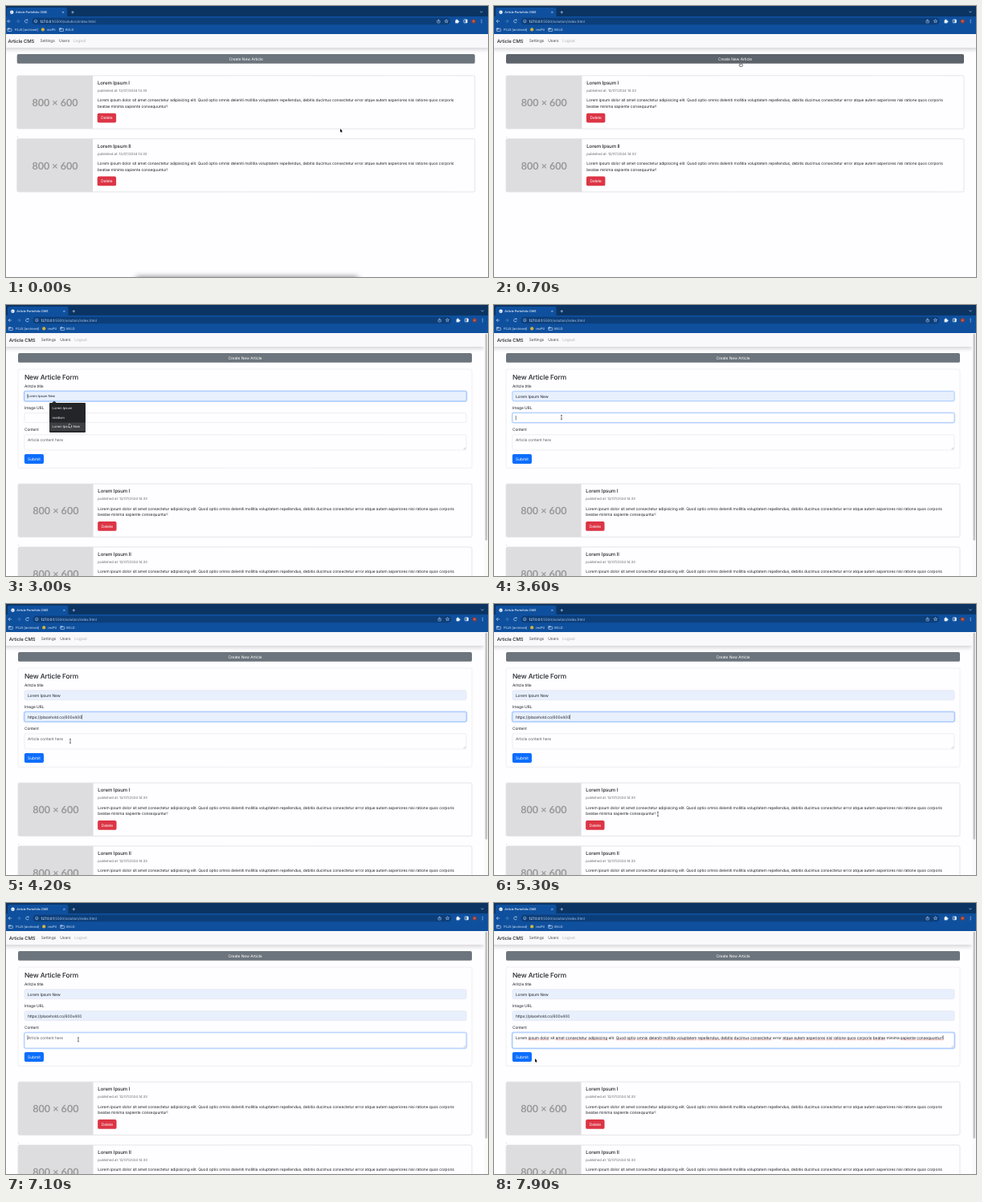
Write an HTML page with a canvas that moves like this. It is 600x338 px and loops after 8000 ms.

```html
<!DOCTYPE html>
<html lang="en">
<head>
<meta charset="utf-8">
<title>Article CMS</title>
<style>
  html, body { margin: 0; width: 100%; height: 100%; overflow: hidden; background: #fefdff; }
  canvas { display: block; width: 600px; height: 338px; }
</style>
</head>
<body>
<canvas id="stage"></canvas>
<script>
const canvas = document.getElementById('stage');
const ctx = canvas.getContext('2d');
const dpr = window.devicePixelRatio || 1;
canvas.width = 600 * dpr;
canvas.height = 338 * dpr;

const LOOP = 8000;
const INK = '#212529';
const BODY = 4.9;
const LINES = [
  'Lorem ipsum dolor sit amet consectetur adipisicing elit. Quod optio omnis deleniti mollitia voluptatem repellendus, debitis ducimus consectetur error atque autem asperiores nisi ratione quos corporis',
  'beatae minima sapiente consequuntur!'
];
const KNOWN_WORDS = ['Lorem', 'sit', 'elit.', 'error', 'minima'];
const IMAGE_URL = 'https://placehold.co/600x400';

// Moments of the story, in ms
const AT = {
  form: 1200, titleFocus: 2100, titleList: 2300, titlePick: 3200,
  urlFocus: 3500, urlList: 3700, urlPick: 4050,
  drag: 5500, dragEnd: 5900, contentFocus: 7000, paste: 7300
};

// Pointer stops: time, x, y
const PATH = [
  [0, 416, 153], [150, 416, 153], [650, 307, 70], [900, 306, 69.5], [1300, 306, 69.5],
  [1800, 227, 119], [2000, 227, 117], [2300, 227, 117], [2900, 79, 148], [3200, 77.5, 148],
  [3500, 84, 140], [3800, 84, 140], [4000, 80, 157], [4200, 80, 171], [4700, 81, 172],
  [5000, 126, 273], [5300, 204, 262], [5500, 204, 262], [5900, 115, 257], [6300, 115, 257],
  [6900, 90, 170], [7400, 90, 171], [7900, 51, 194], [8000, 51, 194]
];

let t = 0;
let mouse = { x: 0, y: 0 };

const clamp = v => Math.max(0, Math.min(1, v));
const ramp = (start, length = 150) => clamp((t - start) / length);
const within = (start, end) => t >= start && t < end;
const focusAmount = (start, end) => Math.min(ramp(start), 1 - ramp(end));
const over = (x, y, w, h) => mouse.x >= x && mouse.x <= x + w && mouse.y >= y && mouse.y <= y + h;

function pointer() {
  const i = PATH.findIndex((stop, k) => k > 0 && t <= stop[0]);
  const [t0, x0, y0] = PATH[i - 1];
  const [t1, x1, y1] = PATH[i];
  const p = (t - t0) / (t1 - t0);
  const e = p * p * (3 - 2 * p);
  return { x: x0 + (x1 - x0) * e, y: y0 + (y1 - y0) * e };
}

function setFont(size, weight = 400, family = 'Inter') {
  ctx.font = `${weight} ${size}px ${family}, sans-serif`;
  ctx.letterSpacing = family === 'Inter' ? `${-0.0145 * size}px` : '0px';
  ctx.textRendering = 'geometricPrecision';
}

// y is the middle of the capitals
function text(str, x, y, { size = BODY, color = INK, weight = 400, align = 'left', family } = {}) {
  setFont(size, weight, family);
  ctx.textAlign = align;
  ctx.fillStyle = color;
  ctx.fillText(str, x, y + size * 0.36);
  return ctx.measureText(str).width;
}

function rect(x, y, w, h, color) {
  ctx.fillStyle = color;
  ctx.fillRect(x, y, w, h);
}

function box(x, y, w, h, r, fill, stroke, line = 0.5) {
  ctx.beginPath();
  ctx.roundRect(x, y, w, h, r);
  if (fill) { ctx.fillStyle = fill; ctx.fill(); }
  if (stroke) { ctx.strokeStyle = stroke; ctx.lineWidth = line; ctx.stroke(); }
}

function dot(x, y, r, color) {
  ctx.beginPath();
  ctx.arc(x, y, r, 0, 7);
  ctx.fillStyle = color;
  ctx.fill();
}

function stroke(points, color, width = 0.6) {
  ctx.beginPath();
  points.forEach(([x, y]) => ctx.lineTo(x, y));
  ctx.strokeStyle = color;
  ctx.lineWidth = width;
  ctx.stroke();
}

function folder(x, y) {
  box(x, y - 1.7, 2.4, 1.5, 0.4, null, '#d5e4f8', 0.6);
  box(x, y - 1.1, 5, 3.2, 0.5, null, '#d5e4f8', 0.6);
}

function browser() {
  const pale = '#d5e4f8', dim = '#5d8fcb';
  rect(-3, 0, 606, 14, '#0b3463');
  box(2, 2, 75.5, 14, 2, '#0f509e');
  rect(-3, 13, 606, 22, '#0f509e');
  dot(8.5, 7.8, 2.2, '#f2f6fc');
  stroke([[7, 7.2], [8.8, 8], [8, 9.3]], '#7fa8d8', 0.7);
  text('Article Portofolio CMS', 13.3, 7.8, { size: 3.8, color: '#f4f8ff', weight: 500 });
  stroke([[71.4, 6.8], [73.4, 8.8]], pale);
  stroke([[73.4, 6.8], [71.4, 8.8]], pale);
  stroke([[82.6, 7.8], [86, 7.8]], pale);
  stroke([[84.3, 6.1], [84.3, 9.5]], pale);
  stroke([[591.4, 6.6], [593, 8.2], [594.6, 6.6]], pale);

  stroke([[5, 17], [3, 19], [5, 21]], pale);
  stroke([[3, 19], [7, 19]], pale);
  stroke([[16, 17], [18, 19], [16, 21]], dim);
  stroke([[14, 19], [18, 19]], dim);
  ctx.beginPath();
  ctx.arc(26.5, 19, 1.9, 0.3, 5.5);
  ctx.strokeStyle = pale;
  ctx.lineWidth = 0.6;
  ctx.stroke();
  rect(27.2, 16.8, 1.2, 1.2, pale);

  box(33.5, 14.7, 521, 8.6, 4.3, '#0c3e7a');
  box(36.5, 17.2, 3.6, 3.6, 1.8, null, pale);
  stroke([[38.3, 18.8], [38.3, 20]], pale);
  const hostWidth = text('127.0.0.1', 43.6, 19, { size: 4.5, color: '#ffffff' });
  text(':5500/solution/index.html', 43.6 + hostWidth, 19, { size: 4.5, color: '#a9c4e6' });

  box(538, 18, 3.4, 3, 0.4, null, pale, 0.5);
  stroke([[539.7, 19.6], [539.7, 16.4]], pale, 0.5);
  ctx.beginPath();
  for (let i = 0; i < 10; i++) {
    const r = i % 2 ? 1 : 2.3, a = i * Math.PI / 5 - Math.PI / 2;
    ctx.lineTo(549.5 + r * Math.cos(a), 19 + r * Math.sin(a));
  }
  ctx.closePath();
  ctx.strokeStyle = pale;
  ctx.lineWidth = 0.5;
  ctx.stroke();
  rect(560.6, 17.6, 3.7, 3.8, '#eef4fd');
  dot(562.4, 17.3, 0.9, '#eef4fd');
  dot(564.6, 19.4, 0.9, '#eef4fd');
  box(571.3, 16.9, 4, 4, 0.4, null, '#eef4fd', 0.7);
  rect(573.4, 17, 2, 4, '#eef4fd');
  dot(583.3, 19, 2.6, '#a33a2c');
  text('A', 583.3, 19, { size: 3, color: '#f3d9d2', align: 'center' });
  [17.2, 19, 20.8].forEach(y => dot(593.2, y, 0.5, '#eef4fd'));

  folder(3.3, 29.4);
  text('FSJS [archived]', 12, 29.4, { size: 4, color: '#dbe8f9' });
  dot(47.2, 29.4, 2.1, '#d3b23c');
  text('recPtl', 52.2, 29.4, { size: 4, color: '#dbe8f9' });
  folder(67.8, 29.4);
  text('BVLD', 75.3, 29.4, { size: 4, color: '#dbe8f9' });
}

function navbar(width) {
  ctx.save();
  ctx.shadowColor = 'rgba(0,0,0,.17)';
  ctx.shadowBlur = 5 * dpr;
  ctx.shadowOffsetY = 2.5 * dpr;
  rect(-3, 35, width + 3, 17, '#f9f8fb');
  ctx.restore();
  text('Article CMS', 3.8, 43.6, { size: 5.95, weight: 500 });
  text('Settings', 43.8, 43.7, { color: '#4b4d51' });
  text('Users', 67.3, 43.7, { color: '#4b4d51' });
  text('Logout', 85.2, 43.7, { color: '#b2b3b6' });
}

function button(label, x, y, w, h, color, hoverColor) {
  box(x, y, w, h, 1.9, over(x, y, w, h) ? hoverColor : color);
  text(label, x + w / 2, y + h / 2, { color: '#fff', align: 'center' });
}

function paragraph(x, y, selectable) {
  if (selectable && within(AT.drag, AT.contentFocus)) {
    setFont(BODY);
    const ends = LINES.map(line => x + ctx.measureText(line).width);
    const done = t >= AT.dragEnd;
    const from = done ? x : Math.max(x, mouse.x);
    const upper = done || mouse.y < y + 4;
    if (upper) rect(from, y - 3.8, ends[0] - from + 0.8, 7.5, '#b3d3fb');
    const lowerFrom = upper ? x : from;
    rect(lowerFrom, y + 3.7, Math.max(0, ends[1] - lowerFrom), 7.5, '#b3d3fb');
  }
  LINES.forEach((line, i) => text(line, x, y + i * 7.5));
}

function card(y, width, title, selectable) {
  const photo = width / 6;
  const x = 20.2 + photo;
  box(15, y, width, 66.3, 1.9, '#fefdff', '#d3d3d8', 0.6);
  box(15.2, y + 0.2, photo - 0.8, 66, [1.7, 0, 0, 1.7], '#dddcde');
  text('800 × 600', 15 + photo / 2 - 0.2, y + 33.4,
    { size: 12.6, color: '#999', weight: 700, family: 'Lato', align: 'center' });
  text(title, x, y + 9.2, { size: 6.1, weight: 500 });
  text('published at: 12/07/2024 14:33', x, y + 18.7, { size: 4.35, color: '#686b70' });
  paragraph(x, y + 30.8, selectable);
  button('Delete', x - 0.2, y + 47, 23.4, 11.7, '#dc3545', '#bb2d3b');
}

function field(y, h, focus, filled) {
  if (focus > 0) box(22.4, y - 0.6, 551.2, h + 1.2, 2.4, null, `rgba(13,110,253,${0.28 * focus})`, 1.3);
  box(23, y, 550, h, 1.9, filled ? '#e8f0fe' : '#fefdff', focus > 0.3 ? '#86b7fe' : '#e2e2e7', 0.6);
}

const caret = (x, y) => rect(x, y - 2.8, 0.5, 5.6, '#111');

function popup(y, width, items, active) {
  stroke([[58, y + 0.3], [60, y - 1.3], [62, y + 0.3]], '#242528', 1.4);
  box(54, y, width, items.length * 11.4 + 2.8, 1.2, '#242528');
  items.forEach((item, i) => {
    const mid = y + 7 + i * 11.4;
    if (i === active) rect(54, mid - 5.2, width, 10.6, '#3e3f43');
    text(item, 57.6, mid, { size: 4.15, color: '#eeeef0' });
  });
}

function misspellings(x, y) {
  let at = x;
  setFont(BODY);
  const gap = ctx.measureText(' ').width;
  ctx.save();
  ctx.setLineDash([0.9, 0.35]);
  LINES.join(' ').split(' ').forEach(word => {
    const w = ctx.measureText(word).width;
    if (!KNOWN_WORDS.includes(word)) stroke([[at, y], [at + w, y]], '#e2525a', 0.6);
    at += w + gap;
  });
  ctx.restore();
}

function form() {
  box(15, 80, 565, 123.3, 1.9, '#fefdff', '#e4e4e9', 0.6);
  text('New Article Form', 22.9, 90, { size: 8.4, weight: 500 });
  text('Aritcle title', 22.9, 101.2);
  text('Image URL', 22.9, 128.2);
  text('Content', 22.9, 155.2);

  const titleHover = within(AT.titleList, AT.titlePick) && over(54, 143.5, 45, 16);
  const titleDone = t >= AT.titlePick;
  field(107.7, 12, focusAmount(AT.titleFocus, AT.urlFocus), titleHover || titleDone);
  if (titleDone) text('Lorem Ipsum New', 26.9, 113.8);
  else if (titleHover) text('Lorem Ipsum New', 26.9, 113.8, { size: 4.1 });
  if (within(AT.titleFocus, AT.urlFocus)) caret(titleDone ? 68.2 : 26.7, 113.8);

  const urlHover = within(AT.urlList, AT.urlPick) && over(54, 149, 68, 14);
  const urlDone = t >= AT.urlPick;
  field(134.7, 11.9, focusAmount(AT.urlFocus, AT.drag), urlHover || urlDone);
  let urlWidth = 0;
  if (urlDone) urlWidth = text(IMAGE_URL, 26.9, 140.8);
  else if (urlHover) text(IMAGE_URL, 26.9, 140.8, { size: 4.1 });
  if (within(AT.urlFocus, AT.drag)) caret(26.9 + urlWidth, 140.8);

  field(161.8, 19.2, ramp(AT.contentFocus), false);
  stroke([[569.5, 180], [572, 177.5]], '#8a8a8e', 0.4);
  stroke([[570.9, 180], [572, 178.9]], '#8a8a8e', 0.4);
  if (t >= AT.paste) {
    const w = text(LINES.join(' '), 26.9, 167.9);
    misspellings(26.9, 170.7);
    caret(26.9 + w, 167.9);
  } else {
    text('Article content here', 26.9, 167.9, { color: '#5d6166' });
    if (t >= AT.contentFocus) caret(26.7, 167.9);
  }
  button('Submit', 22.9, 186, 24.1, 11.9, '#0d6efd', '#0b5ed7');

  if (within(AT.titleList, AT.titlePick)) {
    popup(122, 45, ['Lorem Ipsum', 'medium', 'Lorem Ipsum New'], titleHover ? 2 : -1);
  }
  if (within(AT.urlList, AT.urlPick)) popup(149, 68, [IMAGE_URL], urlHover ? 0 : -1);
}

function arrow(x, y) {
  ctx.beginPath();
  [[0, 0], [0, 4.4], [1, 3.5], [1.7, 5], [2.4, 4.7], [1.8, 3.3], [3.1, 3.2]]
    .forEach(([dx, dy]) => ctx.lineTo(x + dx, y + dy));
  ctx.closePath();
  ctx.strokeStyle = '#fff';
  ctx.lineWidth = 0.9;
  ctx.stroke();
  ctx.fillStyle = '#111';
  ctx.fill();
}

function hand(x, y) {
  box(x - 1.6, y + 2.3, 4.2, 3.3, 1.2, '#fff', '#222', 0.6);
  box(x - 0.5, y, 1.2, 4, 0.6, '#fff', '#222', 0.5);
  rect(x - 0.2, y + 2.4, 0.7, 2, '#fff');
}

function beam(x, y) {
  stroke([[x, y - 2.5], [x, y + 2.5]], '#222', 0.6);
  [-2.5, 2.5].forEach(d => stroke([[x - 0.9, y + d], [x + 0.9, y + d]], '#222', 0.6));
}

function cursor(open, width) {
  const { x, y } = mouse;
  const listed = within(AT.titleList, AT.titlePick) && over(54, 122, 45, 37)
    || within(AT.urlList, AT.urlPick) && over(54, 149, 68, 14);
  const clickable = over(15, 60, width, 12)
    || open && (over(22.9, 186, 24, 12) || over(114, 270, 23.4, 11.7));
  const editable = open && (over(23, 107, 550, 13) || over(23, 134, 550, 13)
    || over(23, 161, 550, 20) || over(114, 250, 450, 16));
  if (listed) arrow(x, y);
  else if (clickable) hand(x, y);
  else if (editable) beam(x, y);
  else arrow(x, y);
}

function dockShadow() {
  const fade = 1 - ramp(0, 250);
  if (!fade) return;
  ctx.save();
  ctx.globalAlpha = fade;
  ctx.shadowColor = 'rgba(0,0,0,.55)';
  ctx.shadowBlur = 7 * dpr;
  rect(162, 338, 276, 8, '#777');
  ctx.restore();
}

function draw() {
  t = performance.now() % LOOP;
  mouse = pointer();
  const open = t >= AT.form;
  const width = open ? 565 : 570;
  const shift = open ? 136.3 : 0;

  ctx.setTransform(dpr, 0, 0, dpr, 0, 0);
  rect(0, 0, 600, 338, '#fefdff');
  ctx.save();
  ctx.translate(-1.3 * (1 - ramp(0, 350)) ** 2, 0);
  navbar(open ? 595 : 603);
  browser();
  button('Create New Article', 15, 60, width, 11.8, '#6c757d', '#5c636a');
  card(86.8 + shift, width, 'Lorem Ipsum I', true);
  text('.', 15, 161.8 + shift);
  card(165.6 + shift, width, 'Lorem Ipsum II', false);
  if (open) {
    form();
    rect(595, 35, 5, 303, '#fafafb');
    box(596.5, 35.7, 2.6, 258, 1.3, '#c2c2c5');
  }
  ctx.restore();
  dockShadow();
  cursor(open, width);
  requestAnimationFrame(draw);
}

requestAnimationFrame(draw);
</script>
</body>
</html>
```
